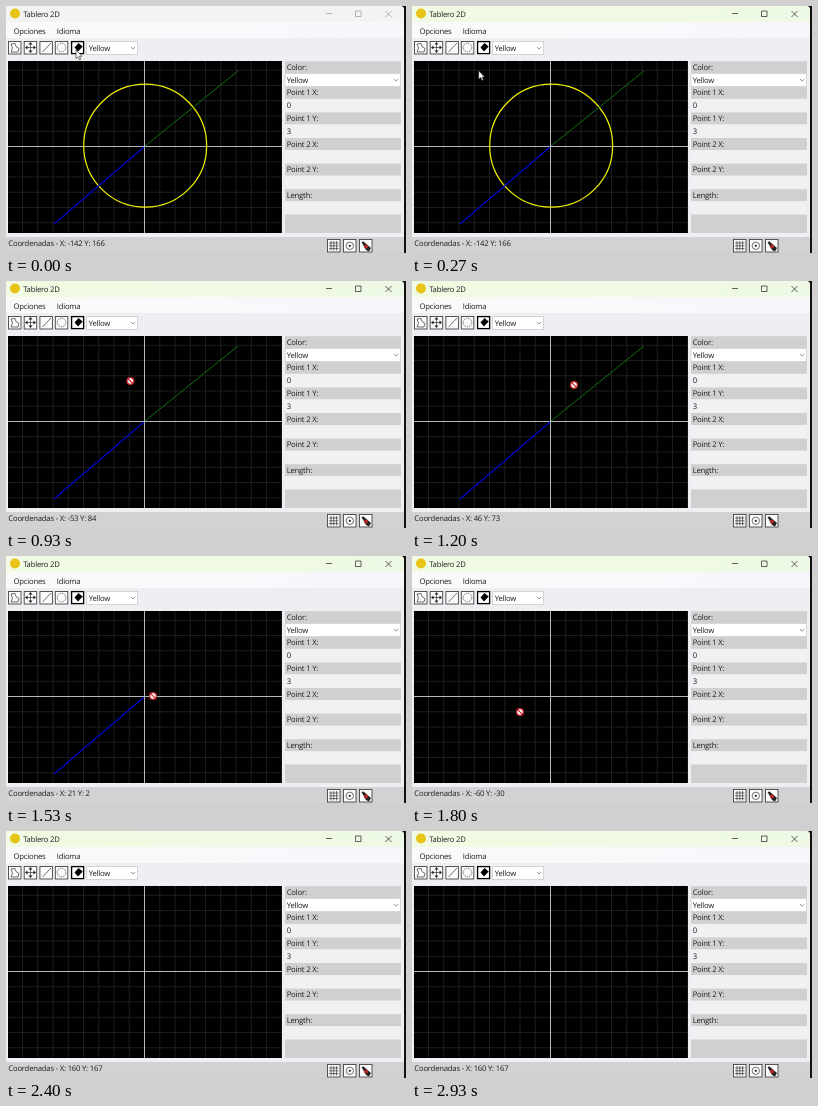
Animation of 400x247 px, one loop 3 s. Source, as an HTML page:

```html
<!DOCTYPE html>
<html lang="es">
<head>
<meta charset="utf-8">
<title>Tablero 2D</title>
<style>
html, body { margin: 0; width: 100%; height: 100%; overflow: hidden; background: #111; }
svg { display: block; width: 100vw; height: 100vh; }
text {
  font: 7.7px "Open Sans", "Noto Sans", sans-serif;
  letter-spacing: -.2px;
  fill: #1c1c1c;
  white-space: pre;
  text-rendering: geometricPrecision;
}
.line { fill: none; stroke: #333; stroke-width: .7; }
.box { fill: #fbfbfb; stroke: #444; stroke-width: .9; }
.chevron { fill: none; stroke: #777; stroke-width: .8; }
</style>
</head>
<body>
<svg viewBox="0 0 400 247">
  <defs>
    <linearGradient id="tint">
      <stop offset="0" stop-color="#f1fae2"/>
      <stop offset="1" stop-color="#eef9e5"/>
    </linearGradient>
    <linearGradient id="menu">
      <stop offset="0" stop-color="#fafafa"/>
      <stop offset="1" stop-color="#f8f6fb"/>
    </linearGradient>
    <clipPath id="view"><rect x="2" y="55" width="274" height="172"/></clipPath>
  </defs>

  <!-- window -->
  <path d="M0 0H394Q398 0 398 4V247H0z" fill="#f0eef2"/>
  <path id="bar" d="M0 0H394Q398 0 398 4V16H0z"/>
  <rect y="16" width="398" height="16" fill="url(#menu)"/>
  <circle cx="9" cy="7.5" r="5" fill="#e8c416"/>
  <text x="17.2" y="10.6">Tablero 2D</text>
  <path id="buttons" class="line" d="M320 7.500h6M349.500 5h5.500v5.500h-5.500zM379.500 5l6 6m0-6l-6 6"/>
  <text x="7.5" y="27.5">Opciones</text>
  <text x="50.7" y="27.5">Idioma</text>

  <!-- toolbar -->
  <g id="tools"></g>
  <path class="line" d="M5 38l4-.5 1 3 3 2-1 3.500H5l1.500-4zM36.500 46l8.500-9"/>
  <path class="line" d="M20 41.500h9M24.500 37v9" stroke-width="1"/>
  <path d="M24.500 36l2 2.500h-4zM24.500 47l2-2.500h-4zM19 41.500l2.500-2v4zM30 41.500l-2.500-2v4z" fill="#222"/>
  <circle class="line" cx="55.500" cy="41.500" r="4.300" stroke-dasharray="1.200 .8"/>
  <rect x="65.600" y="35.600" width="12" height="12" fill="#fff" stroke="#000" stroke-width="1.300"/>
  <path d="M68.500 41.500l4-4.500 4.200 3.500-4.700 5z"/>
  <rect x="80.500" y="35.500" width="51" height="13" fill="#fff" stroke="#d5d5d7"/>
  <text x="82.700" y="44.800">Yellow</text>
  <path class="chevron" d="M125 41l2 2 2-2"/>

  <!-- board -->
  <rect x="2" y="55" width="274" height="172"/>
  <g clip-path="url(#view)" fill="none">
    <path id="grid" stroke="#252525" stroke-width=".8"/>
    <path d="M2 140.500H276M138.500 55V227" stroke="#b8b8b8"/>
    <circle id="ring" cx="139.200" cy="139.700" r="61.500" stroke="#f2f200" stroke-width="1.200"/>
    <path id="green" d="M139 140L232 65" stroke="#107010"/>
    <path id="blue" d="M48 218L138 141" stroke="#0000d8" stroke-width="1.100"/>
  </g>

  <!-- side panel -->
  <g id="panel"></g>
  <rect x="279" y="208.500" width="116" height="18.500" fill="#d1d0d1"/>
  <path class="chevron" d="M388 73l2.200 2.200 2.200-2.200"/>

  <!-- status bar -->
  <rect y="231" width="398" height="16" fill="#d3d1d4"/>
  <text id="status" x="2.300" y="240.300"></text>
  <g id="options"></g>
  <path class="line" d="M325 235v9.500M327.800 235v9.500M330.600 235v9.500M323 237h9.500M323 239.800h9.500M323 242.600h9.500"/>
  <circle class="line" cx="343.800" cy="239.800" r="3.700"/>
  <circle cx="343.800" cy="239.800" r="1.100" fill="#222"/>
  <path d="M355.500 236l2-.5 4 3.500 3.500 3-2 3.500-3-1.500z" fill="#222"/>
  <circle cx="360" cy="240.500" r="2" fill="#b52828"/>

  <g id="cursor">
    <path id="arrow" d="M0 0V8.500L2 6.800 3.300 9.800 4.700 9.200 3.400 6.300H6z" fill="#fff" stroke="#222" stroke-width=".6"/>
    <g id="eraser" fill="none" stroke="#c4262c" stroke-width="1.300">
      <circle r="3.400" fill="#fff"/>
      <path d="M-2.400-2.400l4.800 4.800"/>
    </g>
  </g>
</svg>
<script>
const $ = id => document.getElementById(id);
const FPS = 15, LOOP = 3000, STEP = 15.25;
const CENTER = { x: 138.5, y: 140.5 };

// pointer path: step, x, y
const PATH = [
  [0, 70, 44], [2, 69, 50], [3, 67.5, 57.5], [8, 63.5, 94], [9, 62.5, 93.5],
  [17, 161.5, 104], [18, 162, 104], [22, 149, 139.5], [23, 147, 140],
  [26, 108.5, 155.5], [27, 108, 156], [34, 218.5, 57], [36, 270, 4]
];

const label = (x, y, s) => `<text x="${x}" y="${y}">${s}</text>`;
const boxes = (xs, y) => xs.map(x =>
  `<rect class="box" x="${x}" y="${y}" width="12.500" height="12.500"/>`).join('');

$('tools').innerHTML = boxes([2.5, 18.2, 33.9, 49.3], 35.5);
$('options').innerHTML = boxes([321.5, 337.5, 353.5], 233.5);

let grid = '';
for (let i = -9; i <= 9; i++)
  grid += `M${CENTER.x + i * STEP} 55v172M2 ${CENTER.y + i * STEP}h274`;
$('grid').setAttribute('d', grid);

const fields = [['Color:', 'Yellow'], ['Point 1 X:', '0'], ['Point 1 Y:', '3'],
  ['Point 2 X:', ''], ['Point 2 Y:', ''], ['Length:', '']];
$('panel').innerHTML = fields.map(([name, value], i) => {
  const y = 55.2 + i * 25.6;
  const look = i ? 'fill="#f1f0f2"' : 'fill="#fff" stroke="#d0d0d0" stroke-width=".8"';
  return `<rect x="279" y="${y}" width="116" height="12" fill="#d1d0d1"/>` +
    `<rect x="279" y="${y + 12.3}" width="115.500" height="13" ${look}/>` +
    label(280.7, y + 8.6, name) + label(280.7, y + 21.5, value);
}).join('');

function pointer(step) {
  const i = Math.max(1, PATH.findIndex(p => p[0] >= step));
  const [s0, x0, y0] = PATH[i - 1], [s1, x1, y1] = PATH[i];
  const k = (step - s0) / (s1 - s0);
  return { x: x0 + (x1 - x0) * k, y: y0 + (y1 - y0) * k };
}

const show = (id, on) => $(id).setAttribute('visibility', on ? 'visible' : 'hidden');

function draw() {
  const step = Math.floor(performance.now() % LOOP * FPS / 1000 + .06);
  const active = step > 0, erasing = step >= 11 && step < 30, inside = step < 36;
  $('bar').setAttribute('fill', active ? 'url(#tint)' : '#f3f3f3');
  $('buttons').style.stroke = active ? '#222' : '#999';
  show('ring', step < 12);
  show('green', step < 21);
  show('blue', step < 25);
  show('arrow', inside && !erasing);
  show('eraser', erasing);

  const p = pointer(Math.min(step, 36));
  $('cursor').setAttribute('transform', `translate(${p.x} ${p.y})`);

  // the readout lags one step and only follows the pointer on the board
  const q = pointer(Math.min(Math.max(step - 1, 3), 34));
  const X = Math.round((q.x - CENTER.x) * 2), Y = Math.round((CENTER.y - q.y) * 2);
  $('status').textContent = `Coordenadas - X: ${X} Y: ${Y}`;
  requestAnimationFrame(draw);
}
draw();
</script>
</body>
</html>
```
